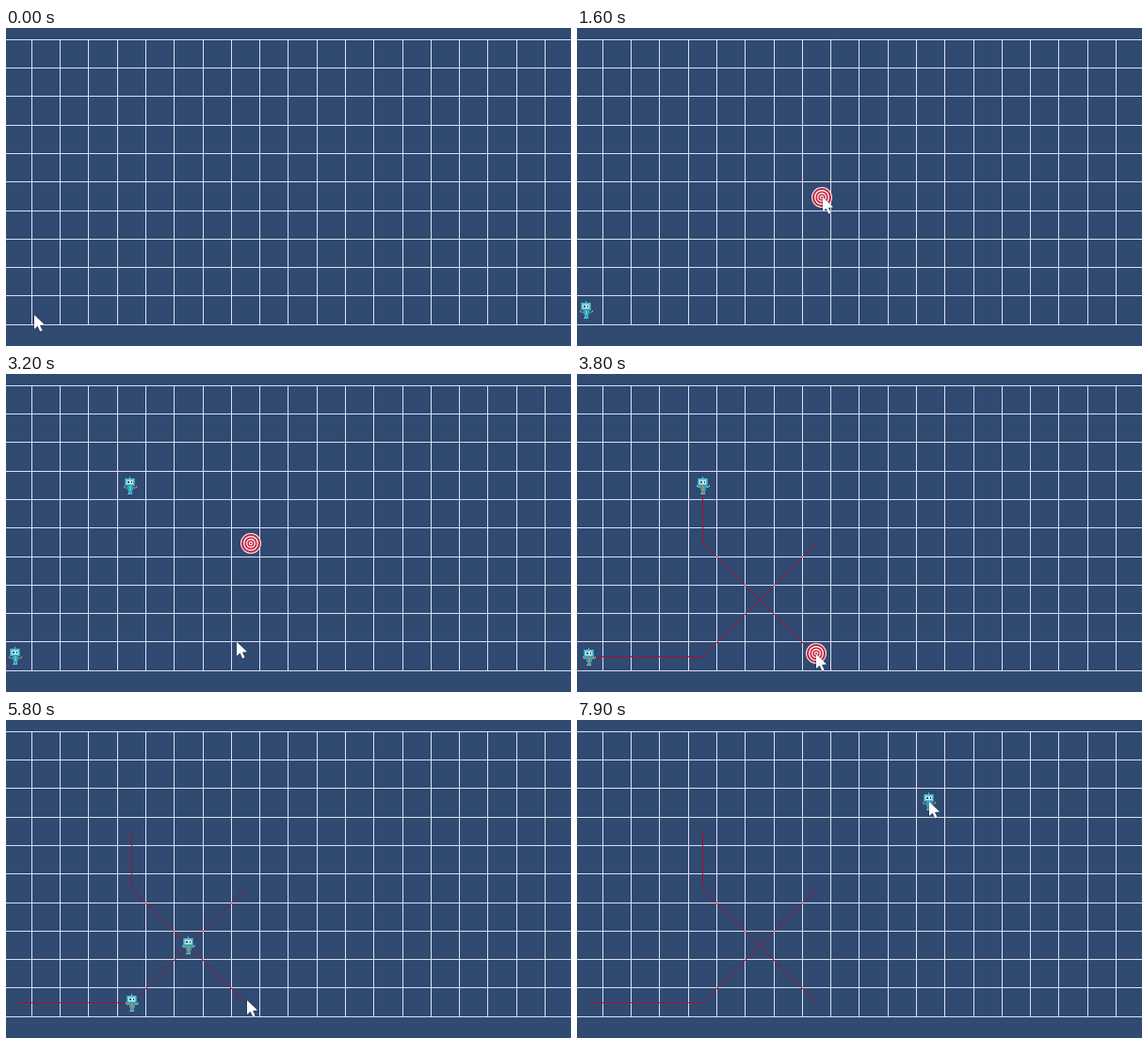
These frames come from a looping animation (600 by 338 pixels, 8000 ms). An HTML page with a canvas:

```html
<!DOCTYPE html>
<html lang="en">
<head>
<meta charset="utf-8">
<title>Grid robots</title>
<style>
  html, body { margin: 0; width: 100%; height: 100%; overflow: hidden; background: #304a72; }
  canvas { display: block; }
</style>
</head>
<body>
<canvas id="stage" width="600" height="338"></canvas>
<script>
const ctx = document.getElementById('stage').getContext('2d');
const LOOP = 8000, TICK = 100, CELL = 30.28;
const START = 3400, STEP = 500;

// Cell coordinates: column from the left, row from the bottom.
const cell = ([col, row]) => [12.5 + CELL * col, 300.5 - CELL * row];

const routes = [
  { from: [0, 0], turn: [4, 0], to: [8, 4], drop: [10, 300], born: 800 },
  { from: [4, 6], turn: [4, 4], to: [8, 0], drop: [132, 119], born: 2300 }
];

// time, x, y of the pointer tip
const pointer = [
  [0, 30, 305], [400, 14, 310], [800, 10, 300], [1000, 10, 300],
  [1500, 261, 180], [1800, 261, 180], [2400, 132, 119], [2700, 132, 119],
  [3300, 254, 298], [3800, 254, 298], [4300, 256, 298], [6300, 256, 298],
  [7100, 382, 91], [7600, 374, 87], [8000, 374, 87]
];

function pointerAt(t) {
  const i = Math.max(1, pointer.findIndex(k => k[0] >= t));
  const [t0, x0, y0] = pointer[i - 1], [t1, x1, y1] = pointer[i];
  const u = (t - t0) / (t1 - t0), e = u * u * (3 - 2 * u);
  return [x0 + (x1 - x0) * e, y0 + (y1 - y0) * e];
}

const distance = (a, b) => Math.max(Math.abs(b[0] - a[0]), Math.abs(b[1] - a[1]));

function cellAfter(route, n) {
  const first = distance(route.from, route.turn);
  const [a, b, k] = n <= first ? [route.from, route.turn, n] : [route.turn, route.to, n - first];
  return [0, 1].map(i => a[i] + Math.sign(b[i] - a[i]) * k);
}

function rect(color, x, y, w, h) {
  ctx.fillStyle = color;
  ctx.fillRect(x, y, w, h);
}

function disc(color, x, y, r) {
  ctx.fillStyle = color;
  ctx.beginPath();
  ctx.arc(x, y, r, 0, 7);
  ctx.fill();
}

function drawGrid() {
  const line = '#dde0f0';
  for (let i = 0; i < 19; i++) rect(line, Math.floor(27.4 + CELL * i), 12, 1, 304);
  for (let i = 0; i < 11; i++) rect(line, 0, Math.floor(12.4 + CELL * i), 600, 1);
}

function drawRoute(route) {
  ctx.strokeStyle = '#a01438';
  ctx.lineWidth = 1;
  ctx.beginPath();
  [route.from, route.turn, route.to].forEach(c => {
    const [x, y] = cell(c).map(v => Math.floor(v) + 0.5);
    ctx.lineTo(x, y);
  });
  ctx.stroke();
}

function drawTarget(x, y) {
  [11, 10, 8, 6.6, 5, 3.6, 2.2, 1].forEach((r, i) => disc(i % 2 ? '#c51f3c' : '#f6eef2', x, y, r));
}

function drawRobot([x, y], active) {
  const teal = '#2f9fb3', cyan = '#55c3d6';
  const trim = active ? '#d9794a' : cyan;
  ctx.save();
  ctx.translate(Math.round(x), Math.round(y));
  rect(cyan, -1, -10, 1, 2);
  rect(teal, -6, -8, 11, 8);
  rect(cyan, -5, -8, 9, 7);
  rect('#c3eaf0', -4, -6, 7, 4);
  rect('#2b5268', -3, -5, 2, 2);
  rect('#2b5268', 1, -5, 1, 2);
  rect(teal, -3, 0, 6, 5);
  rect(trim, -1, 0, 2, 6);
  const hand = active ? -1 : 0;
  for (const side of [-1, 1]) {
    rect(active ? '#4aaabb' : '#60778c', side < 0 ? -6 : 3, 1 + hand, 3, 2);
    rect('#d2837d', side < 0 ? -7 : 6, hand, 1, 2);
  }
  rect(teal, -2, 5, 4, 3);
  rect(trim, -2, 6, 1, 2);
  rect(trim, 1, 6, 1, 2);
  rect(cyan, -3, 8, 5, 1);
  ctx.restore();
}

function drawPointer([x, y]) {
  const outline = new Path2D('M0 0V15L3.6 11.7 6.2 17.5 8.6 16.4 6 11 11 10.6Z');
  ctx.save();
  ctx.translate(x, y);
  ctx.strokeStyle = 'rgba(25, 35, 60, .45)';
  ctx.lineWidth = 1;
  ctx.stroke(outline);
  ctx.fillStyle = '#fff';
  ctx.fill(outline);
  ctx.restore();
}

function draw(t) {
  const running = t >= START;
  const step = Math.floor((t - START) / STEP);
  rect('#304a72', 0, 0, 600, 338);
  drawGrid();
  if (running) routes.forEach(drawRoute);
  if (t >= 1500 && !running) drawTarget(260, 180);
  for (const route of routes) {
    const last = distance(route.from, route.turn) + distance(route.turn, route.to);
    if (running && step <= last) drawRobot(cell(cellAfter(route, step)), true);
    else if (!running && t >= route.born) drawRobot(route.drop, false);
  }
  if (running && step < 1) drawTarget(254, 297);
  if (t >= 7700) drawRobot([374, 87], false);
  drawPointer(pointerAt(t));
}

const origin = performance.now();
function loop() {
  const t = (performance.now() - origin) % LOOP;
  draw(Math.floor(t / TICK) * TICK);
  requestAnimationFrame(loop);
}
loop();
</script>
</body>
</html>
```
